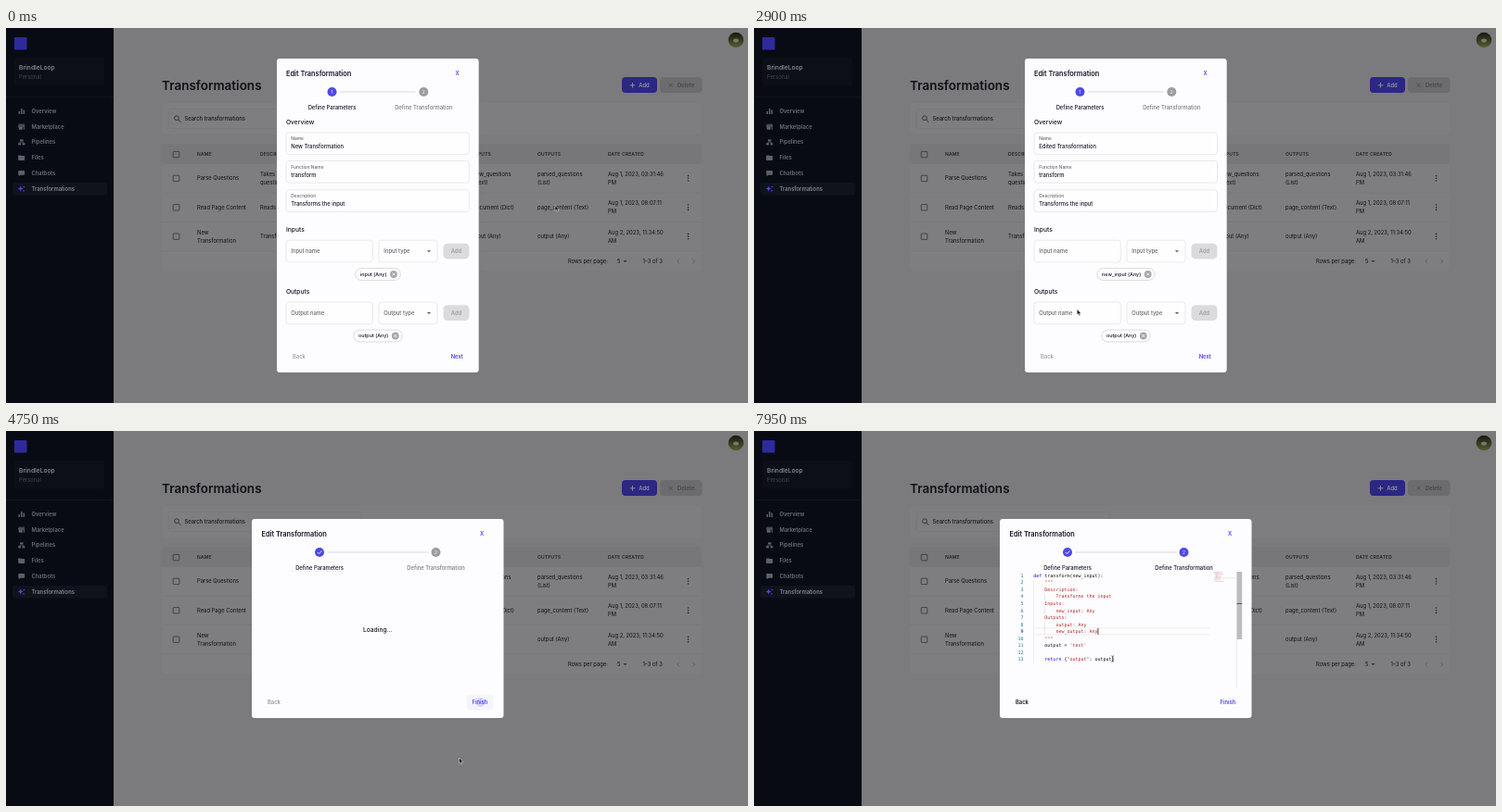
Write an HTML page that moves like this. It is 800 by 405 pixels and loops after 8 s.

```html
<!DOCTYPE html>
<html lang="en">
<head>
<meta charset="utf-8">
<title>Edit Transformation</title>
<style>
  html, body { margin: 0; width: 100%; height: 100%; overflow: hidden; background: #7b7b7d; }
  svg { display: block; width: 100vw; height: 100vh; }
  text { font-family: Inter, sans-serif; white-space: pre; }
  .code text { font-family: "DejaVu Sans Mono", monospace; }
</style>
</head>
<body>
<svg viewBox="0 0 800 405">
  <defs>
    <linearGradient id="avatar" x2="0" y2="1">
      <stop offset="0" stop-color="#14180f"/><stop offset=".5" stop-color="#343a20"/>
      <stop offset="1" stop-color="#5a6030"/>
    </linearGradient>
  </defs>
  <g id="page"></g>
  <g id="dialog"></g>
</svg>
<script>
const LOOP = 8000;
const PRIMARY = '#5048e5', INK = '#121828', MUTED = '#65676f', PAGE_INK = '#0e1118';
let t = 0;

const clamp = v => Math.max(0, Math.min(1, v));
const ease = v => v * v * (3 - 2 * v);
const during = (from, to) => t >= from && t < to;
const typed = (s, from, to) => s.slice(0, Math.floor(clamp((t - from) / (to - from)) * s.length));
const measure = document.createElement('canvas').getContext('2d');
const width = (s, size = 5.83, weight = 500) => {
  measure.font = `${weight} ${size * 10}px Inter, sans-serif`;
  return measure.measureText(s).width / 10;
};
const mix = (a, b, k) => `rgb(${a.map((v, i) => Math.round(v + (b[i] - v) * k))})`;

// Text is placed by its left edge (or anchor) and its visual middle.
const text = (x, y, s, { size = 5.83, weight = 500, fill = INK, anchor = 'start' } = {}) =>
  `<text x="${x}" y="${y + size * .36}" font-size="${size}" font-weight="${weight}" fill="${fill}" text-anchor="${anchor}">${s}</text>`;
const rect = (x, y, w, h, fill, r = 0, extra = '') =>
  `<rect x="${x}" y="${y}" width="${w}" height="${h}" rx="${r}" fill="${fill}" ${extra}/>`;
const circle = (x, y, r, fill, extra = '') => `<circle cx="${x}" cy="${y}" r="${r}" fill="${fill}" ${extra}/>`;
const path = (d, stroke, w = .7, fill = 'none') =>
  `<path d="${d}" fill="${fill}" stroke="${stroke}" stroke-width="${w}" stroke-linejoin="round"/>`;
const cross = (x, y, r, stroke, w = .7) =>
  path(`M${x - r} ${y - r}l${2 * r} ${2 * r}m0 ${-2 * r}l${-2 * r} ${2 * r}`, stroke, w);
const arrowDown = (x, y, fill) => `<path d="M${x - 2.1} ${y - 1}h4.2l-2.1 2.1z" fill="${fill}"/>`;

function sidebar() {
  const grey = '#5c616b';
  const icon = [
    y => rect(13.5, y, 1.5, 3, grey) + rect(16, y - 3, 1.5, 6, grey) + rect(18.5, y - 1.5, 1.5, 4.5, grey),
    y => rect(13.5, y - 3, 6.5, 1, grey) + rect(13.2, y - 1.5, 7, 1.5, grey) + rect(13.8, y, 4, 3, grey) + rect(18.8, y, 1, 3, grey),
    y => rect(15, y - 3, 3.6, 2, grey) + rect(13.2, y + .8, 2.8, 2.2, grey) + rect(17.6, y + .8, 2.8, 2.2, grey) + path(`M16.8 ${y - 1}V${y}M14.6 ${y + 1}V${y}h4.4v1`, grey, .6),
    y => rect(13.2, y - 2.7, 3.4, 2, grey, .6) + rect(13.2, y - 2, 7, 4.8, grey, .7),
    y => rect(13.3, y - 2.7, 6.8, 4.6, grey, .8) + path(`M14 ${y + 1}v2l2-1.5`, grey, .4, grey),
    y => path(`M15.7 ${y - 2.8}l.8 2 2 .8-2 .8-.8 2-.8-2-2-.8 2-.8z`, PRIMARY, .2, PRIMARY) + circle(19.4, y - 2, .8, PRIMARY) + circle(19, y + 2.5, .8, PRIMARY)
  ];
  const items = ['Overview', 'Marketplace', 'Pipelines', 'Files', 'Chatbots', 'Transformations'];
  return rect(0, 0, 116, 405, '#080b13')
    + rect(9, 10, 13.5, 13.5, '#2f2a9c', 1)
    + rect(9, 32, 97, 30, '#0c0f17', 3)
    + text(14, 43, 'BrindleLoop', { size: 6.67, weight: 600, fill: '#83858a' })
    + text(14, 52.5, 'Personal', { weight: 400, fill: '#40454f' })
    + rect(0, 74, 116, .5, '#151a24')
    + rect(7, 167, 102, 13.5, '#0f131b', 3)
    + items.map((name, i) => {
      const y = 90 + i * 16.7;
      return icon[i](y) + text(27.5, y, name, { weight: 600, fill: i == 5 ? '#85868b' : '#6a6e76' });
    }).join('');
}

function table() {
  const head = { size: 5, weight: 600, fill: '#20242c' };
  const cell = { weight: 400, fill: PAGE_INK };
  const lines = (x, y, s) => {
    const parts = s.split('\n');
    return parts.map((p, i) => text(x, y + (i - (parts.length - 1) / 2) * 9.1, p, cell)).join('');
  };
  const checkbox = y => rect(180.2, y - 3.1, 6.6, 6.4, 'none', .6, 'stroke="#343840" stroke-width=".85"');
  const columns = [206, 274, 503.5, 573, 649];
  const rows = [
    ['Parse Questions', 'Takes\nquestions', 'new_questions\n(Text)', 'parsed_questions\n(List)', 'Aug 1, 2023, 03:31:46\nPM'],
    ['Read Page Content', 'Reads', 'document (Dict)', 'page_content (Text)', 'Aug 1, 2023, 08:07:11\nPM'],
    ['New\nTransformation', 'Transforms', 'input (Any)', 'output (Any)', 'Aug 2, 2023, 11:34:50\nAM']
  ];
  return rect(168, 125, 582, 137.5, '#7e7e80', 4) + rect(168, 125, 582, 22, '#777779', 3)
    + checkbox(136.5)
    + ['NAME', 'DESCRIPTION', 'INPUTS', 'OUTPUTS', 'DATE CREATED']
      .map((s, i) => `<g letter-spacing=".14">${text(columns[i], 136.5, s, head)}</g>`).join('')
    + rows.map((row, i) => {
      const y = 162.3 + i * 31.4;
      return checkbox(y) + row.map((s, c) => lines(columns[c], y, s)).join('')
        + [-2.7, 0, 2.7].map(d => circle(735.5, y + d, .8, '#22252c')).join('')
        + rect(168, y + 15.5, 582, .5, '#717275');
    }).join('')
    + text(606, 252, 'Rows per page:', cell) + text(659, 252, '5', cell) + arrowDown(667.5, 252, '#2b2e35')
    + text(686.5, 252, '1–3 of 3', cell)
    + path('M726 249.7l-2.3 2.3 2.3 2.3M740.3 249.7l2.3 2.3-2.3 2.3', '#55575c', .8);
}

function page() {
  return rect(0, 0, 800, 405, '#7b7b7d') + sidebar()
    + text(168, 62, 'Transformations', { size: 13.5, weight: 600, fill: PAGE_INK })
    + rect(664, 53, 38, 17, '#2b2783', 4)
    + path('M675.5 59v5.6M672.7 61.8h5.6', '#93939c', .9)
    + text(682.3, 61.8, 'Add', { weight: 600, fill: '#93939c' })
    + rect(705, 53, 45.5, 17, '#6c6c6e', 4) + cross(716.5, 61.8, 2, '#48484b', .8)
    + text(724, 61.8, 'Delete', { weight: 600, fill: '#48484b' })
    + rect(168, 81, 582, 34, '#7e7e80', 4)
    + rect(175, 87.5, 208, 21, 'none', 3, 'stroke="#747577" stroke-width=".5"')
    + circle(184, 97.2, 2.4, 'none', 'stroke="#24272e" stroke-width=".8"') + path('M185.8 99l2.6 2.8', '#24272e', .9)
    + text(192.5, 98, 'Search transformations', { fill: '#15181f' })
    + table()
    + circle(787, 13, 8.3, 'url(#avatar)') + `<ellipse cx="787" cy="13.5" rx="3" ry="2" fill="#777969"/>`;
}

function field(x, y, w, label, value, from = -1, to = -1, caretAfter = value) {
  const focused = during(from, to), ring = during(from + 80, to + 80);
  const up = value ? 1 : focused ? clamp((t - from) / 100) : 0;
  const fill = focused || ring ? PRIMARY : MUTED;
  return rect(x, y, w, 23.7, '#fefeff', 3, ring ? `stroke="${PRIMARY}" stroke-width="1.3"` : 'stroke="#d9dae0" stroke-width=".55"')
    + text(x + 5.3, y + 12 - 5.4 * up, label, { size: 5.83 - .93 * up, fill })
    + (value ? text(x + 5.3, y + 15.3, value) : '')
    + (focused ? rect(x + 5.6 + width(caretAfter), y + 12, .55, 7, INK) : '');
}

const button = (y, fill, ink) => rect(471.5, y, 28, 16.7, fill, 4.5)
  + text(485.5, y + 8.3, 'Add', { weight: 600, fill: ink, anchor: 'middle' });

function addButton(y, ready, clicked) {
  const off = t < ready ? 1 : clamp((t - clicked) / 150);
  return button(y, mix([80, 72, 229], [219, 219, 221], off), mix([255, 255, 255], [160, 160, 163], off));
}

function chips(y, labels) {
  const widths = labels.map(s => width(s, 5.42, 500) + 20);
  let x = 401 - (widths.reduce((a, b) => a + b) + 4 * (labels.length - 1)) / 2;
  return labels.map((s, i) => {
    const w = widths[i], end = x + w - 7.4;
    const out = rect(x, y - 6.4, w, 12.8, '#fefeff', 6.4, 'stroke="#b6b6bb" stroke-width=".5"')
      + text(x + 5.2, y, s, { size: 5.42 }) + circle(end, y, 3.9, '#a6a6ab') + cross(end, y, 1.5, '#fff', .8);
    x += w + 4;
    return out;
  }).join('');
}

const step = (x, y, n, label, fill, ink) => circle(x, y, 5, fill)
  + (n == '✓' ? path(`M${x - 2.2} ${y}l1.6 1.7 3-3.3`, '#fff', .9)
    : text(x, y, n, { size: 4.8, weight: 400, fill: '#fff', anchor: 'middle' }))
  + text(x, y + 16.5, label, { fill: ink, anchor: 'middle' });

const heading = (x, y, closeX) => text(x, y, 'Edit Transformation', { size: 7.4, weight: 600 })
  + text(closeX, y - .3, 'X', { weight: 600, fill: PRIMARY, anchor: 'middle' });

function typeField(y, label, from, picked, to) {
  const value = during(picked, to) ? 'Any' : '';
  return field(402, y, 63, label, value, from, to)
    + (value ? cross(445, y + 12, 2, '#5d6068', .8) : '') + arrowDown(456, y + 12, '#55585f');
}

function parametersDialog() {
  const name = t < 500 ? 'New' : typed('Edited', 500, 900);
  const inputName = t < 2430 ? typed('new_input', 1350, 1780) : '';
  const outputName = t < 4200 ? typed('new_output', 3100, 3600) : '';
  const inputs = t < 2430 ? ['input (Any)'] : t < 2620 ? ['input (Any)', 'new_input (Any)'] : ['new_input (Any)'];
  const outputs = t < 4200 ? ['output (Any)'] : ['output (Any)', 'new_output (Any)'];
  const section = { size: 6.67, weight: 500 };
  return rect(292, 33, 217.7, 339, '#fdfcff', 3.3) + heading(302, 49, 486.5)
    + rect(360, 68.7, 81.5, .6, '#c0c0c6')
    + step(351.5, 69, '1', 'Define Parameters', PRIMARY, INK)
    + step(450.3, 69, '2', 'Define Transformation', '#9d9da0', '#77787f')
    + text(302, 102, 'Overview', section)
    + field(302, 113, 197.5, 'Name', name + ' Transformation', 430, 1200, name)
    + field(302, 143.5, 197.5, 'Function Name', 'transform')
    + field(302, 174.8, 197.5, 'Description', 'Transforms the input')
    + text(302, 217.5, 'Inputs', section)
    + field(302, 229.2, 93.3, 'Input name', inputName, 1200, 1900)
    + typeField(229.2, 'Input type', 1900, 2050, 2430)
    + addButton(232.7, 2050, 2280) + chips(266, inputs)
    + text(302, 285, 'Outputs', section)
    + field(302, 296, 93.3, 'Output name', outputName, 3000, 3850)
    + typeField(296, 'Output type', 3850, 3950, 4200)
    + addButton(299.3, 3950, 4080) + chips(332.5, outputs)
    + text(309, 355, 'Back', { fill: '#98989d' })
    + (during(4350, 4650) ? rect(472, 346.7, 28.5, 16.5, '#f3f2fb', 3) : '')
    + text(486.3, 355, 'Next', { weight: 600, fill: PRIMARY, anchor: 'middle' });
}

function editor() {
  const LEFT = 301.3, CHAR = 3.01, LINE = 7.54;
  const tint = (c, s) => `<tspan fill="${c}">${s}</tspan>`;
  const red = s => tint('#b3261e', s), blue = s => tint('#1414e0', s);
  const entered = t >= 6350;
  const addition = typed('new_output: Any', 6850, 7500);
  const lines = [
    blue('def') + ' transform(new_input):', red('    """'), red('    Description:'),
    red('        Transforms the input'), red('    Inputs:'), red('        new_input: Any'),
    red('    Outputs:'), red('        output: Any'),
    ...(entered ? [red('        ' + addition)] : []),
    red('    """'), '    output = ' + red("'test'"), '',
    '    ' + blue('return') + ' {' + red('"output"') + ': output}'
  ];
  const active = t < 5950 ? 0 : entered ? 8 : 7;
  const column = t < 5950 ? 0 : entered ? 8 + addition.length : 19;
  const middle = i => 156 + i * LINE;
  const top = middle(active) - LINE / 2;
  return rect(LEFT, top, 190, .6, '#e3e3e6') + rect(LEFT, top + LINE - .5, 190, .6, '#e3e3e6')
    + rect(LEFT, 160, .4, LINE * (lines.length - 1), '#d5d5d8')
    + lines.map((s, i) => {
      const plain = s.replace(/<[^>]*>/g, ''), indent = plain.search(/\S|$/);
      return text(290.5, middle(i), i + 1, { size: 5, weight: 400, fill: i == active ? '#0b216f' : '#237893', anchor: 'end' })
        + text(LEFT, middle(i), s, { size: 5, weight: 400, fill: '#111' })
        + (indent == 8 ? rect(LEFT + 4 * CHAR, middle(i) - LINE / 2, .4, LINE, '#c4c4c8') : '')
        + rect(495 + indent * .4, 152 + i * .83, (plain.length - indent) * .4, .5, '#d9a3a3');
    }).join('')
    + rect(495, 158.6, 25.5, .5, '#ecd6d6')
    + rect(520.3, 152, .5, 125, '#dcdce0') + rect(520.6, 152, 5.6, 73, '#bdbdc0') + rect(520.6, 186, 5.6, .9, '#4b4b50')
    + (t >= 5950 ? rect(LEFT + column * CHAR, top + .3, .8, LINE - .6, '#111') : '');
}

function transformationDialog() {
  const on = clamp((t - 4750) / 150), loading = t < 5250;
  const ripple = 1 - clamp((t - 4700) / 250);
  return rect(265, 95, 271.5, 215, '#fdfcff', 3.3) + heading(275.5, 111, 513.2)
    + rect(346.5, 130.7, 109, .6, '#c0c0c6')
    + step(338, 131, '✓', 'Define Parameters', PRIMARY, INK)
    + step(463.5, 131, '2', 'Define Transformation', mix([157, 157, 160], [80, 72, 229], on), mix([119, 120, 127], [18, 24, 40], on))
    + (loading ? rect(306, 151.3, 58, .4, '#dddde2') + text(400.8, 215, 'Loading...', { size: 6.67, anchor: 'middle' })
      : `<g class="code">${editor()}</g>`)
    + text(282, 293, 'Back', { weight: 600, fill: mix([152, 152, 157], [18, 24, 40], on) })
    + (ripple ? `<g opacity="${ripple}">` + rect(496.8, 284.8, 28.5, 16.5, '#f4f3fc', 3) + circle(511.5, 293, 5, '#cfccf7') + '</g>' : '')
    + text(511, 293, 'Finish', { weight: 600, fill: PRIMARY, anchor: 'middle' });
}

// [time, x, y, shape from this moment on]
const MOUSE = [
  [0, 592, 191.5, 'arrow'], [150, 592, 191.5, 'arrow'], [400, 330, 128, 'beam'], [480, 330, 128, ''],
  [1000, 330, 128, 'beam'], [1150, 335, 241, 'beam'], [1350, 335, 241, ''], [1800, 335, 241, 'beam'],
  [1900, 430, 241, 'beam'], [2100, 430, 241, 'hand'], [2220, 486, 241, 'hand'], [2300, 486, 241, 'hand'],
  [2390, 419.5, 267, 'hand'], [2700, 419.5, 267, 'arrow'], [2950, 340, 308, 'beam'], [3050, 340, 308, ''],
  [3750, 340, 308, 'beam'], [3850, 430, 308, 'beam'], [4000, 430, 308, 'hand'], [4080, 486, 308, 'hand'],
  [4200, 486, 308, 'arrow'], [4400, 488.5, 353, 'hand'], [4650, 488.5, 353, 'arrow'], [4800, 488.5, 353, 'arrow'],
  [5200, 489, 288, 'arrow'], [5400, 455, 262, 'beam'], [5850, 362, 209, 'beam'], [6000, 362, 209, ''],
  [7600, 362, 209, 'beam'], [7880, 386.7, 246, 'beam'], [LOOP, 386.7, 246, 'beam']
];
const SHAPES = {
  '': '',
  arrow: path('M0 0v6l1.4-1.2 1 2.2 1.1-.5-1-2.1h1.9z', '#f4f4f4', .5, '#111'),
  beam: path('M-1.4-3.2q1.4 0 1.4.8v4.8q0 .8-1.4.8M1.4-3.2q-1.4 0-1.4.8M0 2.4q0 .8 1.4.8', '#222', .65),
  hand: path('M0 0q.9-.4 1.1.5v2l2.5.7q.9.3.7 1.3l-.6 2.5h-3.2l-2-2.6q0-.9 1-.5l.3.3v-3.7z', '#fff', .5, '#1c1c1c')
};

function mouse() {
  const i = MOUSE.findIndex(([time]) => time > t) - 1;
  const [t0, x0, y0, shape] = MOUSE[i], [t1, x1, y1] = MOUSE[i + 1];
  const k = ease((t - t0) / (t1 - t0));
  return `<g transform="translate(${x0 + (x1 - x0) * k} ${y0 + (y1 - y0) * k})">${SHAPES[shape]}</g>`;
}

const dialog = document.getElementById('dialog');
document.getElementById('page').innerHTML = page();
let start, last;
function frame(now) {
  start ??= now;
  t = (now - start) % LOOP;
  const markup = (t < 4650 ? parametersDialog() : transformationDialog()) + mouse();
  if (markup !== last) dialog.innerHTML = last = markup;
  requestAnimationFrame(frame);
}
requestAnimationFrame(frame);
</script>
</body>
</html>
```
